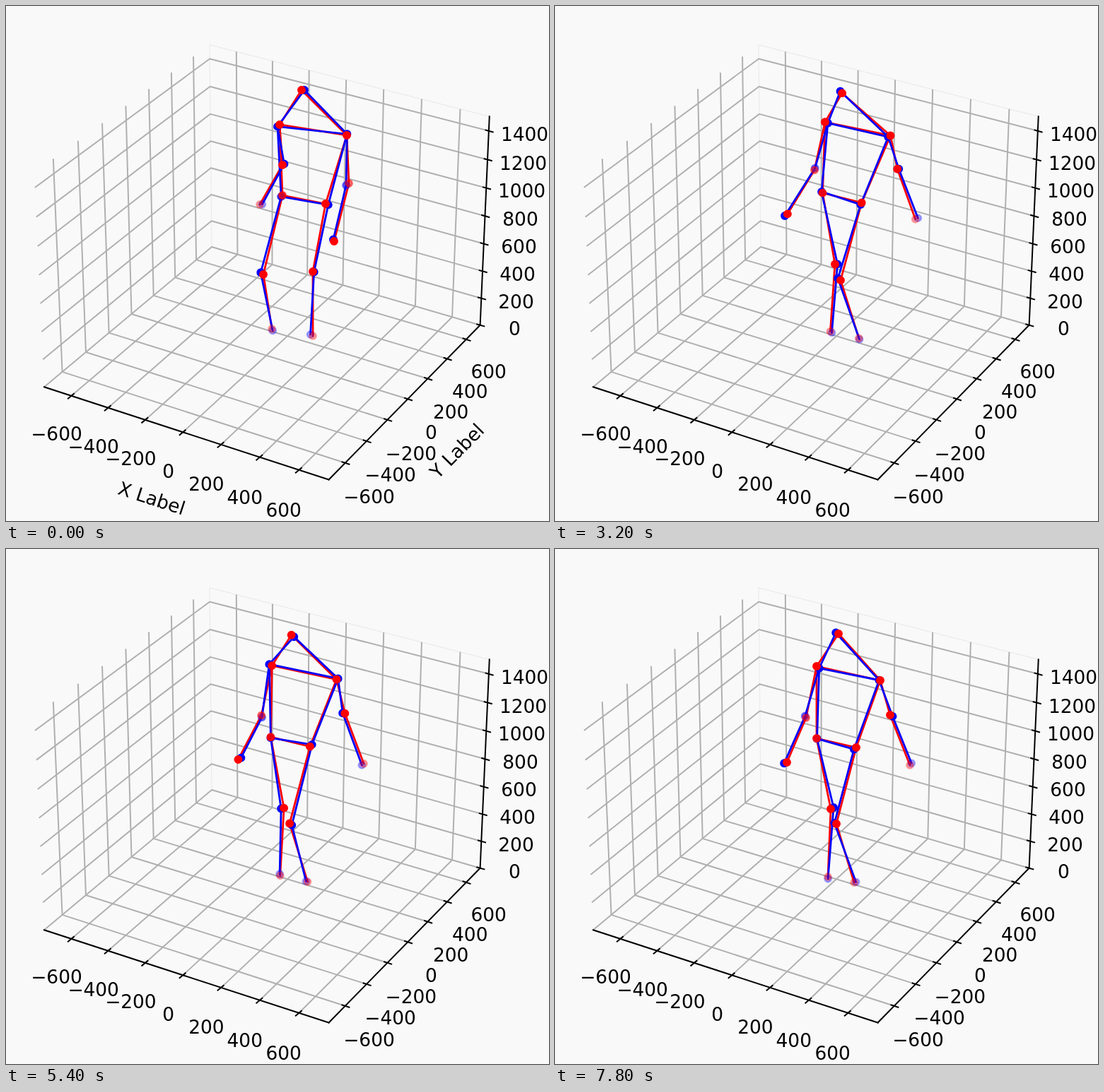
Recreate the animation shown at these times as an HTML page. Size 768x729 px, loop 8 s.

```html
<!DOCTYPE html>
<html lang="en">
<head>
<meta charset="utf-8">
<title>Walking skeleton</title>
<style>
  html, body { margin: 0; width: 100%; height: 100%; overflow: hidden; background: #f9f9f9; }
  svg { display: block; width: 100%; height: 100%; }
  text { font: 26.4px "DejaVu Sans", sans-serif; text-anchor: middle; }
</style>
</head>
<body>
<svg id="stage" viewBox="0 0 768 729">
  <g id="panes" stroke="#ebebeb" stroke-width="1.2"></g>
  <g id="grid" stroke="#b0b0b0" stroke-width="2" fill="none" stroke-linejoin="round"></g>
  <g id="axes" stroke="#000" stroke-width="2" stroke-linecap="square"></g>
  <g id="ticks"></g>
  <g id="titles">
    <text transform="translate(206 697) rotate(18)" y="9">X Label</text>
    <text transform="translate(638 630) rotate(-45.5)" y="9">Y Label</text>
  </g>
  <g id="bones" stroke-width="2.8" stroke-linecap="square" fill="none"></g>
  <g id="dots" stroke-width="2.7"></g>
</svg>
<script>
const LOOP = 8000, STEP = 200, STRIDE_END = 2400, LAST = LOOP - STEP;
const $ = id => document.getElementById(id);

function set(el, attrs) {
  for (const k in attrs) el.setAttribute(k, attrs[k]);
}
function add(parent, tag, attrs, text) {
  const el = document.createElementNS("http://www.w3.org/2000/svg", tag);
  set(el, attrs);
  if (text !== undefined) el.textContent = text;
  return $(parent).appendChild(el);
}
const line = (parent, [x1, y1], [x2, y2]) => add(parent, "line", { x1, y1, x2, y2 });
const lerp = (a, b, f) => a + (b - a) * f;

// Perspective of the unit cube: homogeneous [x, y, w] of the origin and unit corners.
const O = [54, 539.3, 1];
const corner = (x, y, w) => [x * w, y * w, w];
const UNIT = [corner(456.5, 670.5, 0.951), corner(291, 341, 1.088), corner(40, 235.8, 0.957)];
function project(...p) {
  const h = O.map((o, i) => o + p.reduce((sum, v, k) => sum + v * (UNIT[k][i] - o), 0));
  return [h[0] / h[2], h[1] / h[2]];
}

function gridLine(...points) {
  add("grid", "polyline", { points: points.map(p => project(...p)).join(" ") });
}
function tick([x, y], dx, dy) {
  line("axes", [x - dx * 4.5, y - dy * 4.5], [x + dx * 6, y + dy * 6]);
}
function label(x, y, value) {
  add("ticks", "text", { x: x - 0.5, y: y + 9.1 }, String(value).replace("-", "\u2212"));
}

function drawBox() {
  line("panes", project(0, 1, 1), project(1, 1, 1));
  line("panes", project(0, 1, 0), project(0, 1, 1));
  for (let i = 0; i < 7; i++) {
    const s = 0.1 + i * 2 / 15, value = -600 + 200 * i, q = i * i;
    gridLine([s, 0, 0], [s, 1, 0], [s, 1, 1]);
    gridLine([1, s, 0], [0, s, 0], [0, s, 1]);
    tick(project(s, 0, 0), -0.77, 0.64);
    tick(project(1, s, 0), 0.95, 0.31);
    label(72 + 51.9 * i + 0.27 * q, 606 + 17.4 * i + 0.1 * q, value);
    label(514 + 30.4 * i - 0.37 * q, 695 - 31.2 * i + 0.28 * q, value);
  }
  for (let i = 0; i < 8; i++) {
    const s = i * 2 / 15;
    gridLine([0, 0, s], [0, 1, s], [1, 1, s]);
    tick(project(1, 1, s), 0.96, 0.27);
    label(720 + 2 * i, 457 - 38.2 * i - 0.15 * i * i, 200 * i);
  }
  line("axes", project(0, 0, 0), project(1, 0, 0));
  line("axes", project(1, 0, 0), project(1, 1, 0));
  line("axes", project(1, 1, 0), project(1, 1, 1));
}

// Each joint: where it is in mid stride, on standing, and after the slow sway;
// then its opacity (distance) in stride and standing.
const joints = {};
function joint(name, stride, stand, sway, near = 1, far = near) {
  joints[name] = { stride, stand, sway, near, far, phase: Object.keys(joints).length };
}
joint("head", [418, 119], [407, 124], [401, 120]);
joint("shoulderL", [387, 168], [384, 164], [370, 166]);
joint("shoulderR", [482, 183], [477, 183], [460, 186]);
joint("elbowL", [391, 225], [369, 231], [355, 239], 1, 0.5);
joint("elbowR", [485, 251], [486, 230], [474, 235], 0.5, 1);
joint("handL", [359, 281], [329, 293], [328, 302], 0.3, 1);
joint("handR", [464, 333], [511, 301], [502, 306], 1, 0.3);
joint("hipL", [391, 268], [380, 264], [370, 268], 0.75, 0.9);
joint("hipR", [452, 280], [435, 278], [426, 281]);
joint("kneeL", [364, 380], [397, 365], [390, 368]);
joint("kneeR", [434, 376], [405, 388], [398, 389]);
joint("footL", [376, 457], [390, 460], [386, 464], 0.3);
joint("footR", [434, 467], [431, 470], [423, 472], 0.3);

function position(name, color, t) {
  const { stride, stand, sway, phase } = joints[name];
  const walking = t < STRIDE_END;
  const [from, to] = walking ? [stride, stand] : [stand, sway];
  const f = walking ? (t / STRIDE_END) ** 3 : (t - STRIDE_END) / (LAST - STRIDE_END);
  const drift = color === "blue" ? 4 : 0;
  return [
    lerp(from[0], to[0], f) + drift * Math.cos(t / 800 + 2.4 * phase),
    lerp(from[1], to[1], f) + drift * 0.7 * Math.sin(t / 650 + 1.9 * phase)
  ];
}

const CHAINS = [
  "head shoulderL shoulderR head",
  "shoulderL elbowL handL",
  "shoulderR elbowR handR",
  "shoulderL hipL kneeL footL",
  "shoulderR hipR kneeR footR",
  "hipL hipR"
].map(chain => chain.split(" "));

const bones = ["red", "blue"].flatMap(color => CHAINS.map(chain =>
  ({ color, chain, el: add("bones", "polyline", { stroke: color }) })));
const dots = ["blue", "red"].flatMap(color => Object.keys(joints).map(name =>
  ({ color, name, el: add("dots", "circle", { r: 4.6, fill: color, stroke: color }) })));

function draw(time) {
  const t = Math.floor((time % LOOP) / STEP) * STEP;
  set($("titles"), { visibility: t < STEP ? "visible" : "hidden" });
  for (const { color, chain, el } of bones)
    set(el, { points: chain.map(name => position(name, color, t)).join(" ") });
  for (const { color, name, el } of dots) {
    const [cx, cy] = position(name, color, t);
    const alpha = t < STRIDE_END * 0.75 ? joints[name].near : joints[name].far;
    set(el, { cx, cy, "fill-opacity": alpha, "stroke-opacity": alpha });
  }
}

drawBox();
const start = performance.now();
function animate() {
  draw(performance.now() - start);
  requestAnimationFrame(animate);
}
animate();
</script>
</body>
</html>
```
